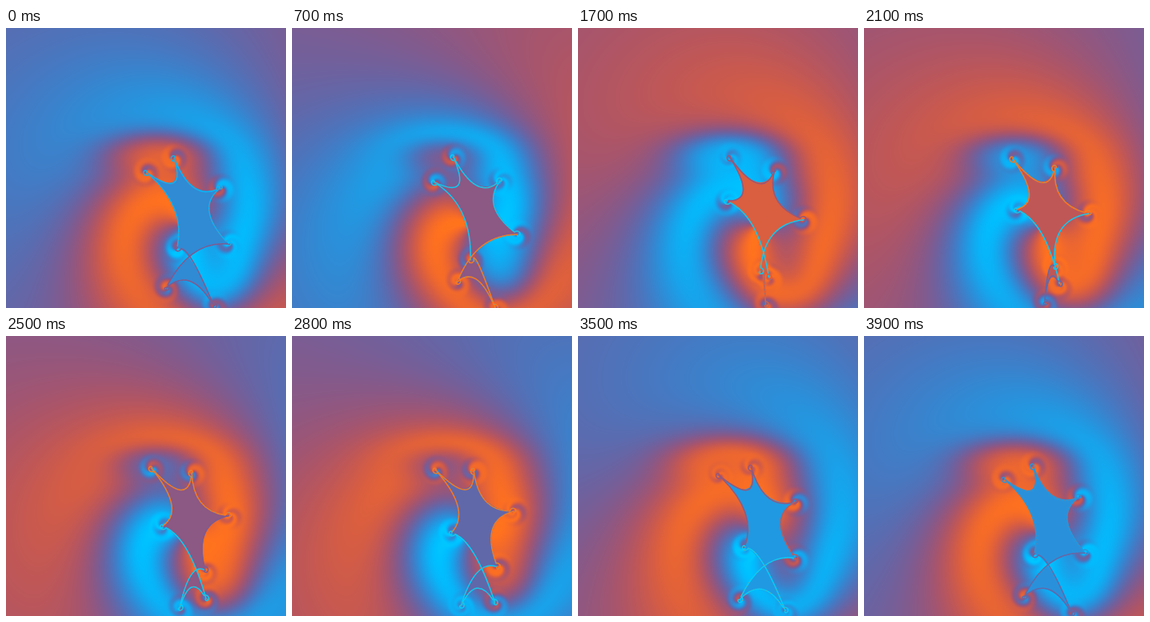
An HTML page with a canvas for the animation above (4000 ms loop, 350 by 350 pixels).

```html
<!DOCTYPE html>
<html>
<head>
<meta charset="utf-8">
<style>
html, body { margin: 0; width: 100%; height: 100%; overflow: hidden; background: #4b78be; }
canvas { display: block; }
</style>
</head>
<body>
<canvas id="stage" width="350" height="350"></canvas>
<script>
const SIZE = 350, LOOP = 4000, STEP = 100, TAU = Math.PI * 2;
const ctx = document.getElementById('stage').getContext('2d');
const image = ctx.createImageData(SIZE, SIZE);
const phase = new Float32Array(SIZE * SIZE);
const gain = new Float32Array(SIZE * SIZE);
const swirl = new Float32Array(SIZE * SIZE);
const clamp = (v, lo, hi) => Math.max(lo, Math.min(hi, v));

// Each curl moves to the place of the next one during a loop.
const curls = [[278, 270], [268, 200], [210, 162], [175, 180], [214, 275], [260, 348], [200, 325]];
const curl = k => curls[(k + curls.length) % curls.length];

function curlAt(k, f) {
  const [a, b, c, d] = [k - 1, k, k + 1, k + 2].map(curl);
  return [0, 1].map(i => b[i] + f / 2 * (c[i] - a[i] +
    f * (2 * a[i] - 5 * b[i] + 4 * c[i] - d[i] + f * (3 * (b[i] - c[i]) + d[i] - a[i]))));
}

const bump = (x, y, cx, cy, rx, ry) => Math.exp(-(((x - cx) / rx) ** 2) - ((y - cy) / ry) ** 2);

// Fixed spiral phase and strength of the wave field.
for (let y = 0, i = 0; y < SIZE; y++) {
  for (let x = 0; x < SIZE; x++, i++) {
    const dx = x - 225, dy = y - 245, d = Math.hypot(dx, dy);
    phase[i] = 0.65 / (1 + (d / 105) ** 2.5) - 0.21 - Math.atan2(dx, -dy) / TAU +
      0.2 * bump(x, y, 190, 154, 70, 27) + 0.22 * bump(x, y, 262, 318, 50, 50);
    gain[i] = 1.08 / (1 + (d / 220) ** 2);
  }
}

const wave = (t, shift, size) => clamp(size * Math.cos(TAU * (t - shift)), -1.1, 1.1);
const color = u => `rgb(${[125 - 125 * u, 92 + 40 * u + 58 * u * u, 145 + 110 * u].map(Math.round)})`;

function addSwirl([cx, cy]) {
  const R = 22;
  for (let y = Math.max(0, Math.ceil(cy - R)); y < Math.min(SIZE, cy + R); y++) {
    for (let x = Math.ceil(cx - R); x < cx + R; x++) {
      const dx = x - cx, dy = y - cy, r = Math.hypot(dx, dy);
      if (r < R) swirl[y * SIZE + x] += 0.16 * (1 - (r / R) ** 2) ** 2 * Math.cos(Math.atan2(dy, dx) - r / 4);
    }
  }
}

function drawField(t) {
  const px = image.data;
  for (let i = 0, o = 0; i < phase.length; i++, o += 4) {
    const u = wave(t, phase[i] + swirl[i], gain[i]);
    px[o] = 125 - 125 * u;
    px[o + 1] = 92 + 40 * u + 58 * u * u;
    px[o + 2] = 145 + 110 * u;
    px[o + 3] = 255;
  }
  ctx.putImageData(image, 0, 0);
}

// Point toward which the filament between two curls bows.
function bend(a, b) {
  const x = (a[0] + b[0]) / 2, y = (a[1] + b[1]) / 2;
  const hubY = 222 + 0.8 * clamp(y - 250, 0, 100);
  return [x + 0.85 * (230 - x), y + 0.85 * (hubY - y)];
}

function drawFilament(a, b, t) {
  const q = bend(a, b), start = Math.atan2(q[1] - a[1], q[0] - a[0]), R = 5;
  const u = wave(t, 0.15 + 0.6 * clamp(((a[1] + b[1]) / 2 - 240) / 50, 0, 1), 1.6);
  ctx.beginPath();
  for (let r = 0; r <= R; r += 0.25) {
    const angle = start + (R - r) * 1.2;
    ctx.lineTo(a[0] + r * Math.cos(angle), a[1] + r * Math.sin(angle));
  }
  ctx.quadraticCurveTo(...q, ...b);
  ctx.strokeStyle = color(u);
  ctx.lineWidth = 1.5;
  ctx.stroke();
  ctx.strokeStyle = color(-u);
  ctx.lineWidth = 0.7;
  ctx.setLineDash([1, 4]);
  ctx.stroke();
  ctx.setLineDash([]);
}

function drawWeb(tips, t) {
  const next = k => tips[(k + 1) % tips.length];
  ctx.beginPath();
  ctx.moveTo(...tips[0]);
  tips.forEach((tip, k) => ctx.quadraticCurveTo(...bend(tip, next(k)), ...next(k)));
  ctx.fillStyle = color(wave(t, 0.9, 0.75));
  ctx.fill();
  tips.forEach((tip, k) => drawFilament(tip, next(k), t));
}

function frame() {
  const t = Math.floor(performance.now() % LOOP / STEP) * STEP / LOOP;
  const tips = curls.map((_, k) => curlAt(k, t));
  swirl.fill(0);
  tips.forEach(addSwirl);
  drawField(t);
  drawWeb(tips, t);
  requestAnimationFrame(frame);
}
frame();
</script>
</body>
</html>
```
